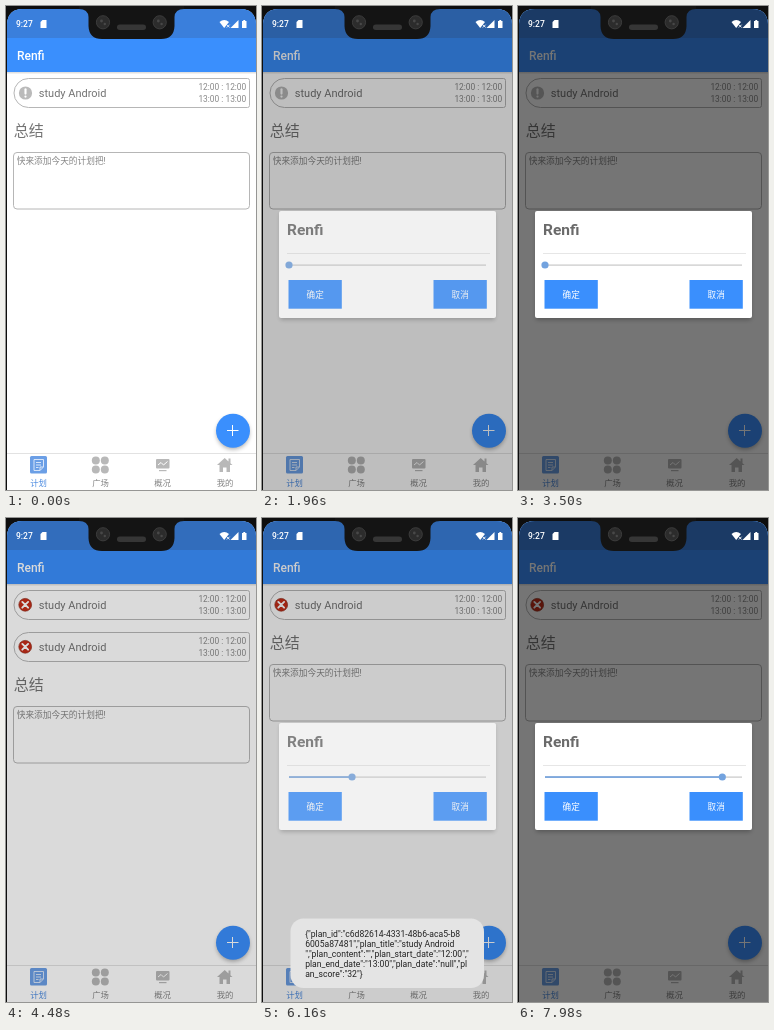
Recreate the animation shown at these times as an HTML page. Size 250 by 484 pixels, loop 8 s.

```html
<!DOCTYPE html>
<html lang="zh-CN">
<head>
<meta charset="utf-8">
<title>Renfi</title>
<style>
html, body { margin: 0; width: 100%; height: 100%; overflow: hidden; background: #000; }
svg { display: block; width: 100vw; height: 100vh; }
text { font-family: Roboto, "Noto Sans CJK SC", "Noto Sans CJK", sans-serif; white-space: pre; }
.mid { text-anchor: middle; }
.end { text-anchor: end; }
.line { fill: none; stroke: #b6b6b6; }
.tab { font-size: 8.4px; fill: #858585; text-anchor: middle; }
.on { fill: #4a8ae0; }
.icon { fill: #b8b8b8; }
</style>
</head>
<body>
<svg viewBox="0 0 250 484" preserveAspectRatio="none">
  <defs>
    <clipPath id="screen"><path d="M1 484V18Q2 3 17 3H234Q249 3 250 18V484Z"/></clipPath>
    <filter id="soft" x="-30%" y="-30%" width="160%" height="160%"><feGaussianBlur stdDeviation="2"/></filter>
    <linearGradient id="fall" x2="0" y2="1">
      <stop stop-color="#000" stop-opacity=".15"/><stop offset="1" stop-color="#000" stop-opacity="0"/>
    </linearGradient>
    <g id="plan">
      <path class="line" d="M22.5 72.5H241.5Q243.5 72.5 243.5 74.5V99.5Q243.5 101.5 241.5 101.5H22.5A14.5 14.5 0 0 1 22.5 72.5Z"/>
      <text x="32.8" y="91" font-size="11" fill="#747474">study Android</text>
      <g font-size="8.4" fill="#888">
        <text class="end" x="240.3" y="84">12:00 : 12:00</text>
        <text class="end" x="240.3" y="96.3">13:00 : 13:00</text>
      </g>
    </g>
    <g id="failed">
      <circle cx="19.2" cy="86.8" r="6.4" fill="#c62d18" stroke="#93301f" stroke-width=".7"/>
      <path d="M16.3 83.9L22.1 89.7M22.1 83.9L16.3 89.7" stroke="#fff" stroke-width="1.9" stroke-linecap="round"/>
    </g>
  </defs>

  <rect width="250" height="484" fill="#0e0e0e"/>
  <g clip-path="url(#screen)">
    <rect width="250" height="484" fill="#fff"/>
    <rect width="250" height="66" fill="#3a8ffd"/>
    <rect width="250" height="32" fill="#3a7fdc"/>
    <rect y="66" width="250" height="2.5" fill="url(#fall)"/>
    <text x="11" y="54" font-size="12" font-weight="500" fill="#fff">Renfi</text>

    <use href="#plan"/>
    <g id="pending">
      <circle cx="19.5" cy="87" r="6.6" fill="#bababa"/>
      <path d="M19.5 83.2V87.6" stroke="#fff" stroke-width="2.1" stroke-linecap="round"/>
      <circle cx="19.5" cy="90.6" r="1.15" fill="#fff"/>
    </g>
    <use id="mark" href="#failed"/>
    <g id="copy" transform="translate(0 42)"><use href="#plan"/><use href="#failed"/></g>

    <g id="summary">
      <text x="7.8" y="129.8" font-size="15" fill="#747474">总结</text>
      <rect class="line" x="7.5" y="146.5" width="236" height="56.5" rx="3.5"/>
      <text x="10.7" y="158.3" font-size="8.7" fill="#858585">快来添加今天的计划把!</text>
    </g>

    <rect y="447" width="250" height="1" fill="#e2e2e2"/>
    <rect x="24" y="450" width="17" height="17.5" rx="1.5" fill="#6b9fe6"/>
    <path d="M28 453.5H37.5V461L34 464.5H28ZM37 461H34V464.5M30 456.5H35M30 459H35M30 461.5H32.5" fill="none" stroke="#e4eefc" stroke-width=".9"/>
    <g class="icon">
      <circle cx="89.8" cy="454.5" r="4"/><circle cx="98.8" cy="454.5" r="4"/>
      <circle cx="89.8" cy="463.5" r="4"/><circle cx="98.8" cy="463.5" r="4"/>
      <rect x="150" y="453" width="13.5" height="9.5" rx="1"/>
      <rect x="153" y="464" width="7.5" height="1.2"/>
      <path d="M218.7 452L222.5 455.4V452.5H224.5V457.2L226.5 459H224V466H220.5V461.5H217V466H213.5V459H211Z"/>
    </g>
    <path d="M152 459L155 456.5L157.5 459L161.5 455.5" fill="none" stroke="#fff"/>
    <text class="tab on" x="32.5" y="480">计划</text>
    <text class="tab" x="94.5" y="480">广场</text>
    <text class="tab" x="156.5" y="480">概况</text>
    <text class="tab" x="219" y="480">我的</text>

    <circle cx="227" cy="427" r="16.5" opacity=".3" filter="url(#soft)"/>
    <circle cx="227" cy="424.7" r="17" fill="#3a8ffd"/>
    <path d="M221 424.5H232.5M226.5 419V430" stroke="#fff"/>

    <rect id="dim" width="250" height="484"/>

    <g id="dialog">
      <rect x="18" y="207" width="215" height="107" rx="2" opacity=".25" filter="url(#soft)"/>
      <rect x="17" y="205" width="217" height="107" rx="2" fill="#fff"/>
      <text x="25" y="229" font-size="15.5" font-weight="700" fill="#6a6a6a">Renfi</text>
      <rect x="25" y="247" width="203" height="1" fill="#e6e6e6"/>
      <rect x="27" y="258.5" width="197" height="1.2" fill="#c8c8c8"/>
      <rect id="bar" x="27" y="258.2" height="1.7" fill="#75a3de"/>
      <circle id="thumb" cy="259" r="3.6" fill="#73a3df"/>
      <rect id="ok" x="26.5" y="274" width="53.3" height="28.7" fill="#3a8ffd"/>
      <rect x="171.5" y="274" width="53.3" height="28.7" fill="#3a8ffd"/>
      <g class="mid" font-size="8.6" fill="#fff">
        <text x="53.2" y="291.5">确定</text><text x="198.2" y="291.5">取消</text>
      </g>
    </g>

    <g id="toast">
      <rect x="28.5" y="400.5" width="193.5" height="69.5" rx="13" fill="#e4e4e4"/>
      <g id="json" font-size="8.6" fill="#222"></g>
    </g>
  </g>

  <path d="M73 0V3Q82 3 82.5 11V20Q83 33 96 33H155Q168 33 168.5 20V11Q169 3 178 3V0Z" fill="#141414"/>
  <g fill="#2c2c2c" stroke="#3c3c3c">
    <circle cx="97" cy="16.3" r="6.6"/><circle cx="153.7" cy="16.3" r="6.6"/>
  </g>
  <g fill="#484848">
    <circle cx="95.5" cy="15" r="1.4"/><circle cx="98.8" cy="18" r="1.2"/>
    <circle cx="152.3" cy="15" r="1.4"/><circle cx="155.6" cy="18" r="1.2"/>
  </g>
  <rect x="111" y="18.5" width="29" height="5.5" rx="2.7" fill="#363636"/>
  <g fill="#fff">
    <text x="10" y="21" font-size="8.5" font-weight="500">9:27</text>
    <path d="M36.5 14H40.5V22H34.5V16Z"/>
    <path d="M213.5 16Q218.2 12 223 16L218.2 22Z"/>
    <path d="M232.5 14V22H224.5Z"/>
    <path d="M236 15H237.3V14H239.2V15H240.5V22H236Z"/>
  </g>
  <path d="M220.8 18.7L223.6 21.5M223.6 18.7L220.8 21.5" stroke="#fff" stroke-width=".9"/>
</svg>
<script>
const LOOP = 8000;
const $ = id => document.getElementById(id);

// Each track lists [time, value]; values between are linear.
const tracks = {
  dim: [[1772, 0], [2172, .54], [4130, .54], [4610, 0], [6012, 0], [6412, .54]],
  dialog: [[1772, 0], [2012, 1], [4130, 1], [4390, 0], [5990, 0], [6215, 1]],
  toast: [[4620, 0], [4900, 1], [6760, 1], [7110, 0]],
  score: [[3560, 0], [3920, 32], [7300, 32], [7630, 90]]
};
const DONE = 4340, MERGED = 4900;

[
  '{"plan_id":"c6d82614-4331-48b6-aca5-b8',
  '6005a87481","plan_title":"study Android',
  '","plan_content":"","plan_start_date":"12:00","',
  'plan_end_date":"13:00","plan_date":"null","pl',
  'an_score":"32"}'
].forEach((row, i) => {
  const line = document.createElementNS('http://www.w3.org/2000/svg', 'text');
  line.setAttribute('x', 43.2);
  line.setAttribute('y', 418.5 + i * 10.2);
  line.textContent = row;
  $('json').append(line);
});

function valueAt(track, t) {
  const next = track.findIndex(k => k[0] > t);
  if (next === 0) return track[0][1];
  if (next < 0) return track[track.length - 1][1];
  const [t0, a] = track[next - 1], [t1, b] = track[next];
  return a + (b - a) * (t - t0) / (t1 - t0);
}

const show = (id, on) => $(id).setAttribute('visibility', on ? 'visible' : 'hidden');

function draw(t) {
  for (const id of ['dim', 'dialog', 'toast']) $(id).setAttribute('opacity', valueAt(tracks[id], t));
  const length = 197 * valueAt(tracks.score, t) / 100;
  $('bar').setAttribute('width', length);
  $('thumb').setAttribute('cx', 27 + length);
  $('ok').setAttribute('fill', t >= 4040 && t < 4390 ? '#3482ea' : '#3a8ffd');
  const twice = t >= DONE && t < MERGED;
  show('pending', t < DONE);
  show('mark', t >= DONE);
  show('copy', twice);
  $('summary').setAttribute('transform', `translate(0 ${twice ? 42 : 0})`);
}

const start = performance.now();
function tick() {
  draw((performance.now() - start) % LOOP);
  requestAnimationFrame(tick);
}
tick();
</script>
</body>
</html>
```
